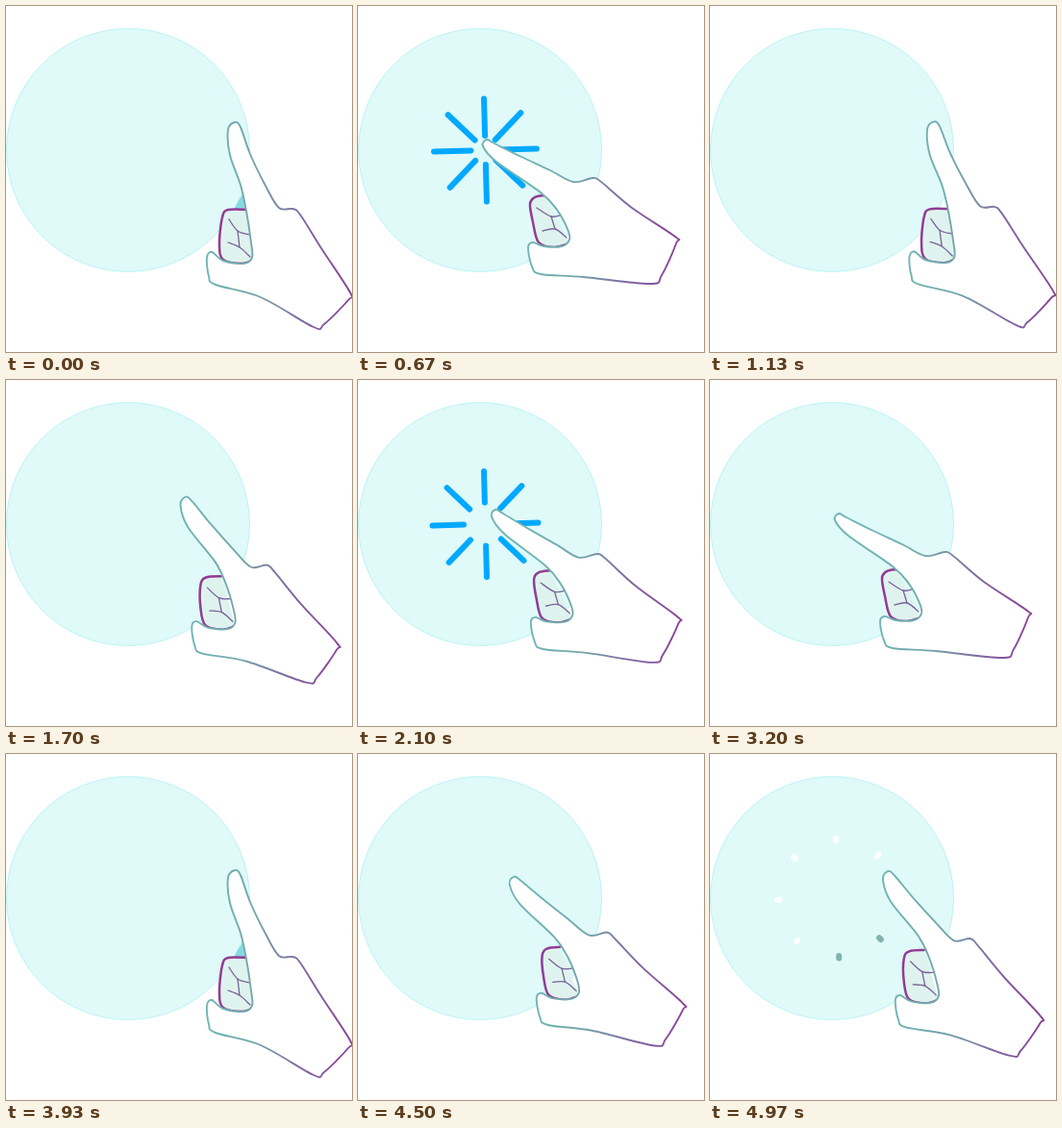
An HTML page with a canvas for the animation above (5.07 s loop, 360 by 360 pixels).

```html
<!DOCTYPE html>
<html lang="en">
<head>
<meta charset="utf-8">
<title>Tap</title>
<style>
  html, body { margin: 0; width: 100%; height: 100%; overflow: hidden; background: #fff; }
  canvas { display: block; width: 100vw; height: 100vh; }
</style>
</head>
<body>
<canvas></canvas>
<script>
const canvas = document.querySelector('canvas');
const ctx = canvas.getContext('2d');
const scale = Math.max(1, window.devicePixelRatio || 1);
canvas.width = canvas.height = 360 * scale;

const LOOP = 5070;
const CYCLE = 41; // ticks of 1/30 s per tap

// Each shape as a resting and a pressing pose.
const hand = {
  rest: [238,121, 244,126, 254,154, 270,187, 284,210, 298,211, 306,217, 328,252, 358,298,
    356,306, 331,331, 320,334, 265,303, 218,290, 211,281, 209,262, 214,256, 226,265,
    247,268, 256,262, 255,246, 250,213, 244,186, 233,155, 231,129],
  press: [134,139, 142,143, 170,157, 200,171, 224,183, 244,179, 253,183, 285,210, 330,240,
    331,247, 316,280, 304,289, 235,282, 190,279, 181,271, 177,251, 182,246, 193,250,
    212,250, 220,243, 218,232, 207,212, 190,194, 144,162, 130,146]
};
const curl = {
  rest: [252,212, 231,212, 225,220, 222,248, 226,264, 246,268, 257,264],
  press: [194,197, 184,199, 179,206, 182,225, 188,246, 204,251, 220,247]
};
const creases = {
  rest: [232,222, 241,234, 253,238, 231,246, 243,251, 254,261],
  press: [186,210, 201,219, 213,217, 192,234, 205,232, 217,241]
};

// Blends the poses; fingertip and wrist travel on slight arcs.
function pose({ rest, press }, p) {
  const mix = i => rest[i] + (press[i] - rest[i]) * p;
  const points = [];
  for (let i = 0; i < rest.length; i += 2) {
    const lift = Math.max(0, (200 - press[i + 1]) / 60) * 8;
    const drop = Math.max(0, (press[i] - 250) / 80) * 4;
    const arc = 4 * p * (1 - p);
    points.push([mix(i), mix(i + 1) + arc * (drop || -lift)]);
  }
  return points;
}

function smoothPath(points, closed) {
  const n = points.length;
  const at = i => closed ? points[(i + n) % n] : points[Math.min(n - 1, Math.max(0, i))];
  ctx.beginPath();
  ctx.moveTo(...points[0]);
  for (let i = 0; i < (closed ? n : n - 1); i++) {
    const [a, b, c, d] = [at(i - 1), at(i), at(i + 1), at(i + 2)];
    ctx.bezierCurveTo(
      b[0] + (c[0] - a[0]) / 6, b[1] + (c[1] - a[1]) / 6,
      c[0] - (d[0] - b[0]) / 6, c[1] - (d[1] - b[1]) / 6, ...c);
  }
  if (closed) ctx.closePath();
}

function paint(fill, stroke, width) {
  if (fill) { ctx.fillStyle = fill; ctx.fill(); }
  if (stroke) { ctx.strokeStyle = stroke; ctx.lineWidth = width; ctx.stroke(); }
}

// The picture changes at rests and in runs of seven steps, given in ticks.
const rests = [0, 36, 77, 118];
const runs = [[3, 17], [20, 34], [44, 58], [60, 75], [84, 99], [101, 116], [125, 140], [142, 157]];
const steps = rests.concat(runs.flatMap(([first, last]) =>
  Array.from({ length: 7 }, (_, i) => first + Math.floor((last - first) * i / 6))));

function pressAmount(phase) {
  if (phase < 7) return 0;
  if (phase < 19) return ((phase - 7) / 12) ** 1.76;
  if (phase < 25) return 1;
  return ((CYCLE - phase) / 16) ** 1.45;
}

function drawRays(phase) {
  if (phase < 21 || phase > 32) return;
  const q = Math.min(1, (phase - 25) / 6);
  const inner = 15 + 45 * Math.max(0, q);
  const outer = 53.5 + (q < 0 ? 46 : 9) * q;
  for (let i = 0; i < 8; i++) {
    const angle = i * Math.PI / 4 - 0.027;
    const x = Math.cos(angle), y = Math.sin(angle);
    ctx.beginPath();
    ctx.moveTo(132.5 + x * inner, 150 + y * inner);
    ctx.lineTo(132.5 + x * outer, 150 + y * outer);
    const spent = i === 1 || i === 2 ? '#82b3ae' : '#fff';
    paint(null, q > 0.9 ? spent : '#00a9ff', 6);
  }
}

function drawHand(p) {
  const outline = pose(hand, p);
  const ink = ctx.createLinearGradient(outline[15][0], 0, outline[8][0], 0);
  ['#70b5b4', '#74a6aa', '#8068a0', '#8a4699'].forEach((color, i) =>
    ink.addColorStop(i / 3, color));

  if (p < 0.02) {
    smoothPath([[246, 196], [238, 212], [252, 212]], false);
    paint('#86d9e2');
  }

  smoothPath(pose(curl, p), false);
  paint('#dff3ee', '#913c94', 2.5);

  const [a, b, c, d, e, f] = pose(creases, p);
  for (const line of [[a, b, c], [d, e, f], [b, e]]) {
    smoothPath(line, false);
    paint(null, '#77629a', 1.3);
  }

  smoothPath(outline, true);
  paint('#fff', ink, 1.9);
}

function draw(time) {
  const tick = Math.floor((time % LOOP) * 0.03 + 0.15);
  const step = Math.max(...steps.filter(s => s <= tick));
  const phase = (step + 5) % CYCLE;

  ctx.setTransform(scale, 0, 0, scale, 0, 0);
  ctx.lineCap = ctx.lineJoin = 'round';
  ctx.fillStyle = '#fff';
  ctx.fillRect(0, 0, 360, 360);
  ctx.beginPath();
  ctx.arc(127, 150, 126.5, 0, Math.PI * 2);
  paint('#e0f9f9', '#a5f0f2', 0.7);
  drawRays(phase);
  drawHand(pressAmount(phase));
}

const start = performance.now();
function loop() {
  draw(performance.now() - start);
  requestAnimationFrame(loop);
}
loop();
</script>
</body>
</html>
```
